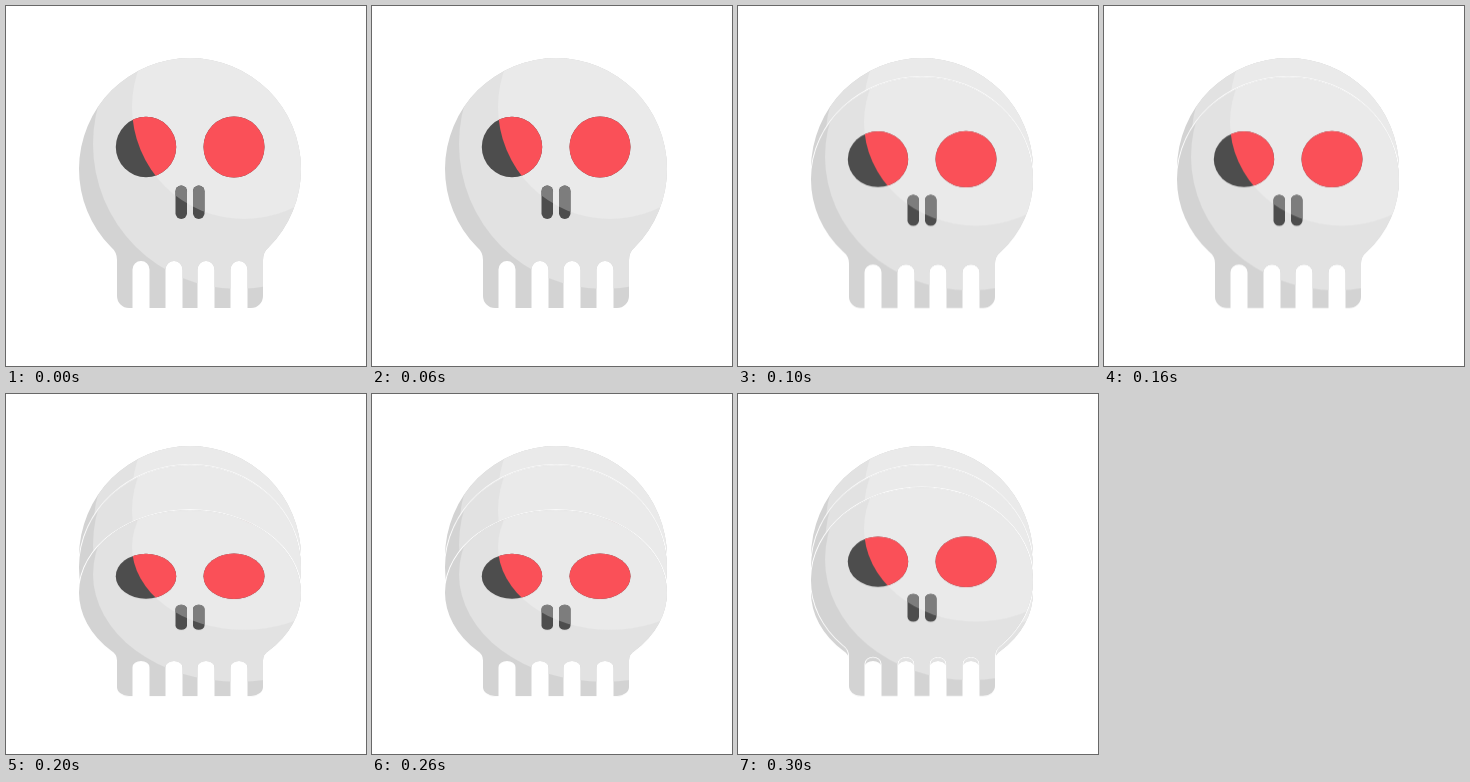
Write an HTML page that moves like this. It is 360x360 px and loops after 0.4 s.

```html
<!DOCTYPE html>
<html lang="en">
<head>
<meta charset="utf-8">
<title>Squashing skull</title>
<style>
  html, body { margin: 0; width: 100%; height: 100%; overflow: hidden; background: #fff; }
  svg { display: block; width: 100%; height: 100%; }

  /* Every pose is squashed towards the teeth and stays until the loop restarts. */
  .pose { transform-origin: 184px 302px; transform: scaleY(var(--squash)); }
  .second { --squash: .924; animation: second .4s step-end infinite; }
  .third  { --squash: .744; animation: third .4s step-end infinite; }
  .fourth { --squash: .834; animation: fourth .4s step-end infinite; }
  @keyframes second { 0% { opacity: 0 } 25%, 100% { opacity: 1 } }
  @keyframes third  { 0% { opacity: 0 } 50%, 100% { opacity: 1 } }
  @keyframes fourth { 0% { opacity: 0 } 75%, 100% { opacity: 1 } }

  .rim { fill: none; stroke: #fff; stroke-width: 1.8; vector-effect: non-scaling-stroke; }
</style>
</head>
<body>
<svg viewBox="0 0 360 360">
  <defs>
    <path id="head" d="M105 241A111 111 0 1 1 263 241Q257 246 257 254V290A12 12 0 0 1 245 302
      H241.5V263.5a8.5 8.5 0 0 0 -17 0V302
      H208.5V263.5a8.5 8.5 0 0 0 -17 0V302
      H176.5V263.5a8.5 8.5 0 0 0 -17 0V302
      H143.5V263.5a8.5 8.5 0 0 0 -17 0V302
      H123A12 12 0 0 1 111 290V254Q111 246 105 241Z"/>
    <g id="eyes">
      <circle cx="140" cy="141" r="30.2"/>
      <circle cx="228" cy="141" r="30.5"/>
    </g>
    <g id="nose">
      <rect x="169.5" y="179.5" width="11.5" height="33.5" rx="5.7"/>
      <rect x="187" y="179.5" width="11.5" height="33.5" rx="5.7"/>
    </g>
    <circle id="glow" cx="238" cy="101" r="112"/>
    <clipPath id="inHead"><use href="#head"/></clipPath>
    <clipPath id="inGlow"><use href="#glow"/></clipPath>
    <g id="skull">
      <use href="#head" class="rim"/>
      <use href="#head" fill="#d3d3d3"/>
      <g clip-path="url(#inHead)">
        <circle cx="232" cy="138" r="145" fill="#e2e2e2"/>
        <use href="#glow" fill="#eaeaea"/>
      </g>
      <g fill="#4d4d4d"><use href="#eyes"/><use href="#nose"/></g>
      <g clip-path="url(#inGlow)">
        <use href="#eyes" fill="#fa5058"/>
        <use href="#nose" fill="#7d7d7d"/>
      </g>
    </g>
  </defs>
  <use href="#skull"/>
  <use href="#skull" class="pose second"/>
  <use href="#skull" class="pose third"/>
  <use href="#skull" class="pose fourth"/>
</svg>
</body>
</html>
```
